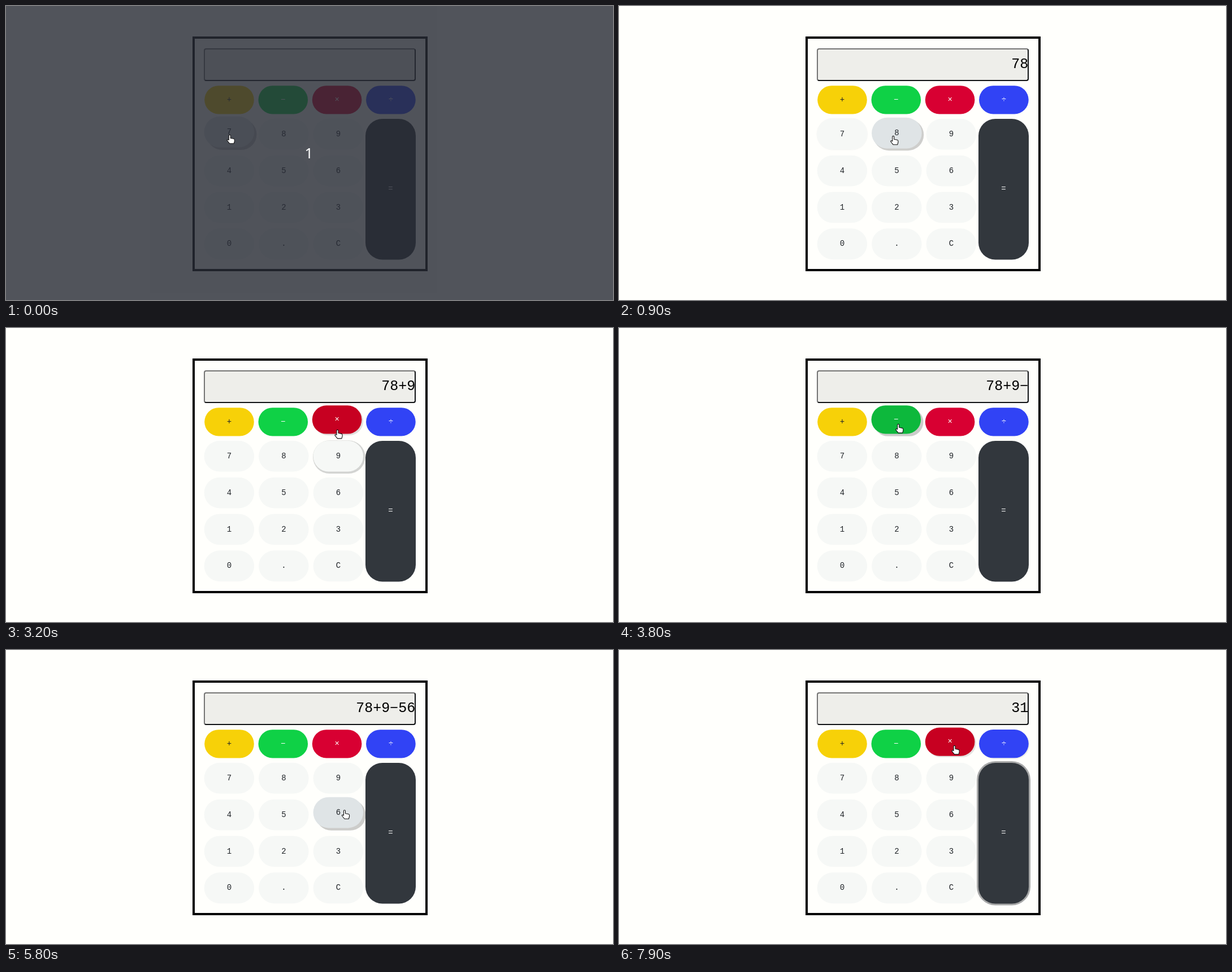
Animation, 1074 px wide and 521 px high, one loop 8000 ms. Source, as an HTML page:

```html
<!DOCTYPE html>
<html lang="en">
<head>
<meta charset="utf-8">
<title>Calculator</title>
<style>
  html, body { margin: 0; width: 100%; height: 100%; overflow: hidden; background: #fffffc; }
  #screen {
    position: absolute; left: 350px; top: 75px; width: 375px; height: 58px;
    box-sizing: border-box; border: 2px solid; border-radius: 4px;
    border-color: #747474 #101214 #101214 #747474; background: #eeeeea;
  }
  svg { position: absolute; left: 0; top: 0; display: block; }
  .mono { font-family: "Liberation Mono", monospace; }
  .count { font: 26px "Noto Sans", sans-serif; }
</style>
</head>
<body>
<div id="screen"></div>
<svg width="1074" height="521" viewBox="0 0 1074 521">
  <rect x="332" y="56" width="412" height="412" fill="none" stroke="#000" stroke-width="4"/>
  <text id="value" class="mono" x="724.2" y="110" font-size="25" text-anchor="end"></text>
  <g id="keys"></g>
  <g id="veil">
    <rect width="1074" height="521" fill="#282c35" fill-opacity=".81"/>
    <text class="count" x="536" y="270" text-anchor="middle" fill="#fff">1</text>
  </g>
  <path id="hand" fill="#fff" stroke="#111" stroke-width="1.1" stroke-linejoin="round"
    d="M-1.6 8.6V1.6a1.5 1.5 0 0 1 3 0V6l5.6 1.1q1.5 .4 1.5 2v2.5l-1.2 4h-7.4l-4.3-5.3q-.6-1.5 .8-1.8 1 0 2 .9z"/>
</svg>
<script>
const LOOP = 8000, STEP = 100, SCAN = 5;
const $ = id => document.getElementById(id);
const clamp = x => Math.max(0, Math.min(1, x));
const mix = (a, b, k) => a + (b - a) * k;
const rgb = c => `rgb(${c.map(Math.round).join()})`;

// normal and hovered colours
const LIGHT = [[246, 248, 246], [223, 228, 230]];
const THEMES = {
  '+': [[247, 209, 8], [218, 181, 6]],
  '−': [[15, 209, 70], [13, 184, 60]],
  '×': [[216, 0, 50], [198, 0, 32]],
  '÷': [[49, 67, 245], [44, 62, 232]],
  '=': [[50, 55, 61], [47, 57, 59]]
};

// pointer stops: key, offset from its centre, arrival, departure, button down
const STOPS = [
  ['7', 1, 1, 0, 550, 390],
  ['8', -6, 3, 780, 1200, 780],
  ['+', 9, 1, 1780, 2150, 1850],
  ['9', 0, 3, 2700, 2980, 2720],
  ['×', 1, 14, 3120, 3220],
  ['−', 4, 4, 3500, 3850, 3550],
  ['5', 6, 9, 4150, 4750, 4320],
  ['6', 3, 8, 5200, 5720, 5250],
  ['÷', -25, 4, 6080, 6080],
  ['−', 4, 4, 6350, 6600],
  ['×', 30, 14, 6720, 6720],
  ['=', -10, -68, 6800, 6800],
  ['=', -4, -45, 7000, 7500, 6960],
  ['÷', -15, 8, 7710, 7710],
  ['×', 8, 3, 7860, LOOP]
].map(([name, dx, dy, from, to, down]) => ({ name, dx, dy, from, to, down }));

const presses = STOPS.filter(s => s.down);

function set(el, attrs) {
  for (const k in attrs) el.setAttribute(k, attrs[k]);
}

function make(parent, tag, attrs = {}) {
  const el = document.createElementNS('http://www.w3.org/2000/svg', tag);
  set(el, attrs);
  return parent.appendChild(el);
}

const keys = {};
function addKey(name, x, y, w, h, r) {
  const g = make($('keys'), 'g');
  const shade = make(g, 'rect');
  const body = make(g, 'rect', { x, y, width: w, height: h, rx: r });
  const label = make(g, 'text', {
    class: 'mono', x: x + w / 2, y: y + h / 2 + 3.6, 'font-size': 14,
    'text-anchor': 'middle', fill: '−×÷='.includes(name) ? '#fff' : '#212529'
  });
  label.textContent = name;
  keys[name] = {
    name, x, y, w, h, r, g, shade, body, over: [],
    cx: x + w / 2, cy: y + h / 2, theme: THEMES[name] || LIGHT
  };
}

[...'+−×÷'].forEach((c, i) => addKey(c, 351.2 + 95.3 * i, 141.2, 87.6, 50.2, 25));
[...'7894561230.C'].forEach((c, i) =>
  addKey(c, 350.6 + 96.5 * (i % 3), 199.8 + 64.85 * Math.floor(i / 3), 88.5, 54.8, 27.4));
addKey('=', 636, 200, 89, 249.5, 30);

function pointer(t) {
  const i = STOPS.findIndex(s => s.to >= t);
  const b = STOPS[i], a = STOPS[i - 1] || b;
  const p = t >= b.from ? 1 : clamp((t - a.to) / (b.from - a.to));
  const k = p * p * (3 - 2 * p);
  const at = s => [keys[s.name].cx + s.dx, keys[s.name].cy + s.dy];
  const [x0, y0] = at(a), [x1, y1] = at(b);
  return [mix(x0, x1, k), mix(y0, y1, k)];
}

function inside(k, [px, py]) {
  const dx = Math.max(0, Math.abs(px - k.cx) - k.w / 2 + k.r);
  const dy = Math.max(0, Math.abs(py - k.cy) - k.h / 2 + k.r);
  return Math.hypot(dx, dy) <= k.r;
}

// spans of time the pointer spends over each key
for (const k of Object.values(keys)) {
  let span = null;
  for (let t = -500; t <= LOOP; t += SCAN) {
    const hit = inside(k, pointer(t));
    if (hit && !span) k.over.push(span = [t, Infinity]);
    if (!hit && span) { span[1] = t; span = null; }
  }
}

// the screen text after each click
let typed = '';
for (const p of presses) {
  p.up = p.down + 80;
  typed += p.name;
  if (p.name === '=') {
    const sum = typed.slice(0, -1).replace('−', '+-').split('+');
    typed = String(sum.reduce((a, n) => a + Number(n), 0));
  }
  p.text = typed;
}

const rise = (t, from) => 1 - (1 - clamp((t - from) / 150)) ** 2;
const soft = (t, from) => clamp((t - from) / 200);
const during = (f, t, [a, b]) => Math.max(0, f(t, a) - f(t, b));

function drawKey(k, t) {
  const peak = f => Math.max(0, ...k.over.map(s => during(f, t, s)));
  const i = presses.findIndex(p => p.name === k.name);
  const press = presses[i], next = presses[i + 1];
  const dip = press ? during(rise, t, [press.down, press.up]) : 0;
  const focus = press ? during(soft, t, [press.down, next ? next.down : Infinity]) : 0;

  const [base, hot] = k.theme;
  const cast = peak(soft) * (1 - dip * focus);
  const glow = focus * (1 - cast);
  const spread = 3 * glow, off = 4.4 * cast;
  const share = glow / (glow + cast || 1);
  const ring = base.map(c => mix(c, k.theme === LIGHT ? 190 : 110, 0.5));
  set(k.g, { transform: `translate(0 ${-4 * peak(rise) * (1 - dip)})` });
  set(k.body, { fill: rgb(base.map((c, j) => mix(c, hot[j], peak(rise)))) });
  set(k.shade, {
    x: k.x + off - spread, y: k.y + off - spread,
    width: k.w + 2 * spread, height: k.h + 2 * spread, rx: k.r + spread,
    fill: rgb(ring.map(c => c * share)),
    'fill-opacity': 0.2 * cast + 0.5 * glow
  });
}

function draw(t) {
  Object.values(keys).forEach(k => drawKey(k, t));
  const done = presses.filter(p => p.up <= t).pop();
  $('value').textContent = done ? done.text : '';
  set($('hand'), { transform: `translate(${pointer(t)})` });
  $('veil').style.display = t < 100 ? '' : 'none';
}

const start = performance.now();
function tick() {
  const t = (performance.now() - start) % LOOP;
  draw(Math.floor(t / STEP) * STEP);
  requestAnimationFrame(tick);
}
tick();
</script>
</body>
</html>
```
